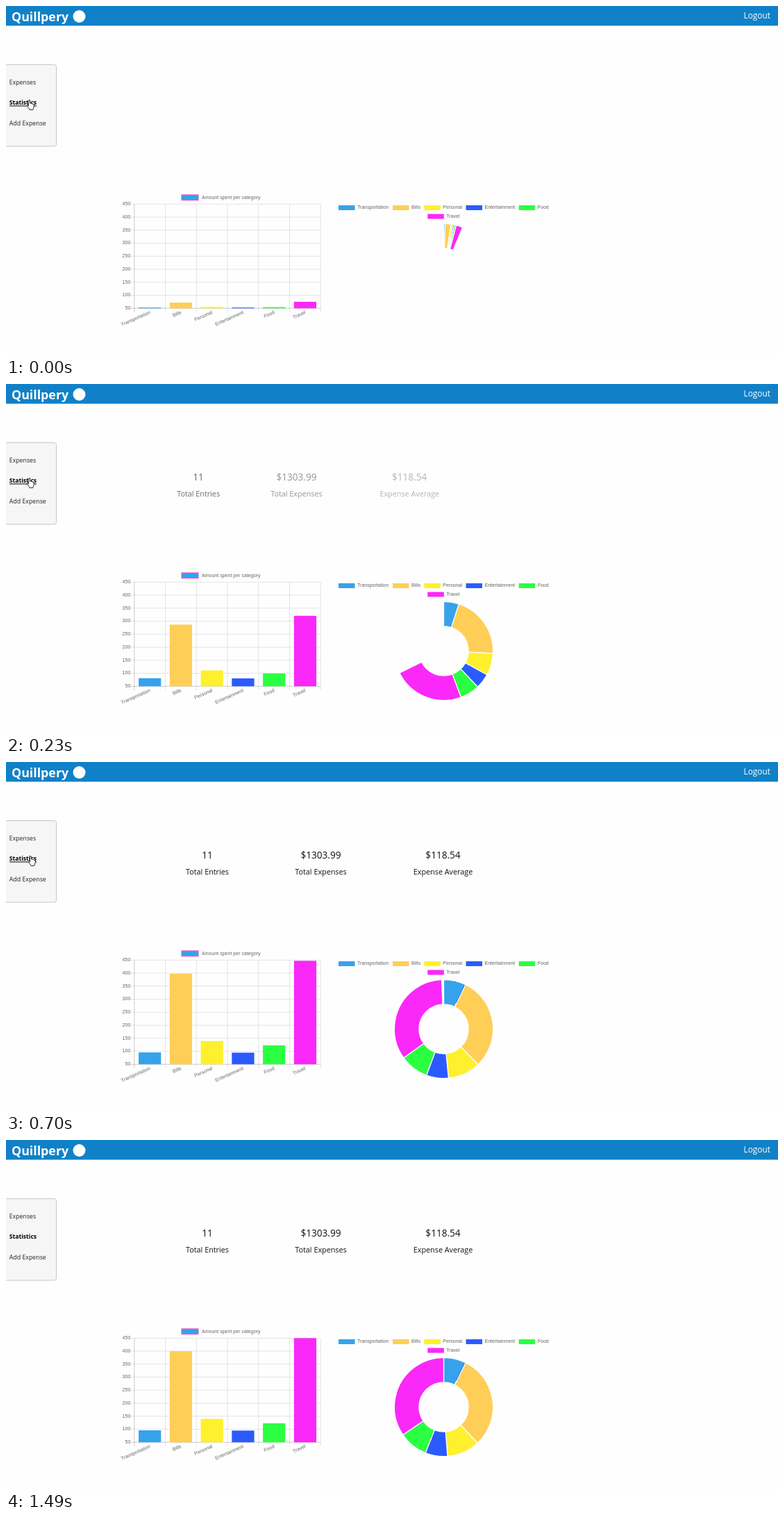
Recreate the animation shown at these times as an HTML page with a canvas. Size 1112 by 504 pixels, loop 1960 ms.

```html
<!DOCTYPE html>
<html lang="en">
<head>
<meta charset="utf-8">
<title>Expense statistics</title>
<style>
html, body { margin: 0; width: 100%; height: 100%; overflow: hidden; background: #fefefe; }
canvas { display: block; }
</style>
</head>
<body>
<canvas id="stage" width="1112" height="504"></canvas>
<script>
const ctx = document.getElementById('stage').getContext('2d');
const LOOP = 1960;
const STEPS = [0, 70, 150, 230, 310, 390, 460, 540, 620, 700, 780, 860, 940, 1030,
  1110, 1170, 1250, 1330, 1410, 1490];
const UI = '"Open Sans", "Noto Sans", sans-serif';
const CHART = '"Liberation Sans", Arial, sans-serif';
const TAU = Math.PI * 2;

// legend: position of the colour box beside the doughnut
const categories = [
  { name: 'Transportation', value: 96, color: '#36a2eb', legend: [479, 290.5] },
  { name: 'Bills', value: 400, color: '#ffce56', legend: [557, 290.5] },
  { name: 'Personal', value: 140, color: '#fef02d', legend: [602.3, 290.5] },
  { name: 'Entertainment', value: 95, color: '#2b5bff', legend: [662.5, 290.5] },
  { name: 'Food', value: 123, color: '#2bff41', legend: [738.7, 290.5] },
  { name: 'Travel', value: 450, color: '#fa28f8', legend: [607.3, 303] }
];
const total = categories.reduce((sum, c) => sum + c.value, 0);

const stats = [
  { number: '11', label: 'Total Entries', x: 290, shift: 76, end: 277 },
  { number: '$1303.99', label: 'Total Expenses', x: 453.5, shift: 84, end: 395 },
  { number: '$118.54', label: 'Expense Average', x: 629.5, shift: 82, end: 560 }
];

const HAND = [[2.6, 0], [4, .6], [4.2, 4.6], [6, 4.7], [7.6, 5.4], [9.2, 6], [9.8, 7.4],
  [9.4, 10.4], [8.2, 14], [3.6, 14], [2, 11.2], [-.4, 8.2], [.2, 7.2], [2, 8.4], [1.9, .8]];
const ARROW = [[0, 0], [0, 9.6], [2.2, 7.7], [3.7, 11], [5.2, 10.3], [3.8, 7.1], [6.6, 6.8]];

function text(str, x, y, size, color, { font = UI, align = 'left', weight = '', base = 'alphabetic' } = {}) {
  ctx.font = `${weight} ${size}px ${font}`;
  ctx.textAlign = align;
  ctx.textBaseline = base;
  ctx.fillStyle = color;
  ctx.fillText(str, x, y);
}

function chartText(str, x, y, align = 'left') {
  text(str, x, y, 7.04, '#666', { font: CHART, align, base: 'middle' });
}

function rect(x, y, w, h, color) {
  ctx.fillStyle = color;
  ctx.fillRect(x, y, w, h);
}

function line(x1, y1, x2, y2, color, width) {
  ctx.beginPath();
  ctx.moveTo(x1, y1);
  ctx.lineTo(x2, y2);
  ctx.strokeStyle = color;
  ctx.lineWidth = width;
  ctx.stroke();
}

function drawPage(t) {
  rect(0, 0, 1112, 504, '#fefefe');
  rect(0, 0, 1112, 28.4, '#1081c8');
  text('Quillpery', 8, 22, 17.8, '#fff', { weight: 'bold' });
  ctx.beginPath();
  ctx.arc(105.5, 15, 9, 0, TAU);
  ctx.fill();
  text('Logout', 1062.5, 18.3, 11.9, '#fff');

  ctx.beginPath();
  ctx.roundRect(-5, 84.5, 77.5, 117.5, 3);
  ctx.fillStyle = '#f6f6f6';
  ctx.fill();
  ctx.strokeStyle = '#c6c6c6';
  ctx.lineWidth = 1;
  ctx.stroke();
  text('Expenses', 4.8, 112.7, 8.75, '#222');
  text('Statistics', 4.8, 142.4, 8.6, '#000', { weight: 'bold' });
  if (t < 860) rect(5, 143.4, 39, 1, '#000');
  text('Add Expense', 4.8, 172.2, 8.8, '#222');
}

function drawStats(t) {
  for (const s of stats) {
    const p = Math.min(1, t / s.end);
    const x = s.x - s.shift * (1 - p);
    ctx.globalAlpha = p < 1 ? .75 * p : 1;
    text(s.number, x, 139.2, 13.6, '#111', { align: 'center' });
    text(s.label, x, 161.6, 10.8, '#111', { align: 'center' });
  }
  ctx.globalAlpha = 1;
}

function drawBars(grow) {
  const left = 184.8, top = 285.3, bottom = 435.3, step = 44.75;
  for (let i = 0; i <= 8; i++) {
    const y = bottom - i * 18.75;
    line(179.5, y, 453.3, y, i ? 'rgba(0,0,0,.1)' : 'rgba(0,0,0,.2)', 1);
    chartText(50 + i * 50, 179.3, y, 'right');
  }
  for (let i = 0; i <= 6; i++) {
    const x = left + i * step;
    line(x, top, x, bottom + 5.5, i ? 'rgba(0,0,0,.1)' : 'rgba(0,0,0,.2)', 1);
  }
  categories.forEach((c, i) => {
    const mid = left + (i + .5) * step;
    const height = (c.value - 50) * .375 * grow;
    rect(mid - 16.1, bottom - height, 32.2, height, c.color);
    ctx.save();
    ctx.translate(mid + .3, 441);
    ctx.rotate(-.42);
    chartText(c.name, 0, 0, 'right');
    ctx.restore();
  });
  rect(253, 272, 24, 7.6, '#36a2eb');
  ctx.strokeStyle = '#d668c4';
  ctx.lineWidth = 1.3;
  ctx.strokeRect(253, 272, 24, 7.6);
  chartText('Amount spent per category', 282, 275.7);
}

function drawDoughnut(grow, t) {
  const cx = 630.5, cy = 384.5, outer = 71.1, inner = 35.6;
  let start = -TAU / 4;
  for (const c of categories) {
    const [x, y] = c.legend;
    rect(x, y - 3.5, 23.5, 7, c.color);
    chartText(c.name, x + 27, y);

    const end = start + c.value / total * TAU * grow;
    ctx.beginPath();
    ctx.arc(cx, cy, outer, start, end);
    ctx.arc(cx, cy, inner, end, start, true);
    ctx.closePath();
    ctx.fillStyle = c.color;
    ctx.fill();
    ctx.strokeStyle = '#fff';
    ctx.lineWidth = 1.3;
    ctx.lineJoin = 'bevel';
    ctx.stroke();
    start = end;
  }
  if (t >= 620) {
    const a = -1.128, cos = Math.cos(a), sin = Math.sin(a);
    line(cx + 42 * cos, cy + 42 * sin, cx + 70 * cos, cy + 70 * sin, '#2b6bf2', .9);
  }
}

function drawCursor(t) {
  let x = t < 390 ? 30.5 : 32.5, y = 135.5;
  if (t > 1110) {
    const p = (t - 1110) / 380;
    x = 1089.8 - 12 * p;
    y = 347.3 + 160 * p;
  } else if (t > 780) {
    const p = (t - 780) / 330, ease = p * p * (3 - 2 * p);
    x += (1089.8 - x) * ease;
    y += (347.3 - y) * ease;
  }
  ctx.beginPath();
  for (const [dx, dy] of t < 860 ? HAND : ARROW) ctx.lineTo(x + dx, y + dy);
  ctx.closePath();
  ctx.fillStyle = '#fff';
  ctx.fill();
  ctx.strokeStyle = '#111';
  ctx.lineWidth = .9;
  ctx.lineJoin = 'round';
  ctx.stroke();
}

function draw(now) {
  const time = now % LOOP;
  const t = STEPS.findLast(s => s <= time) ?? 0;
  const grow = 1 - (1 - Math.min(1, (t + 16) / 1000)) ** 4;
  drawPage(t);
  drawStats(t);
  drawBars(grow);
  drawDoughnut(grow, t);
  drawCursor(t);
}

const begin = performance.now();
function tick() {
  draw(performance.now() - begin);
  requestAnimationFrame(tick);
}
tick();
</script>
</body>
</html>
```
